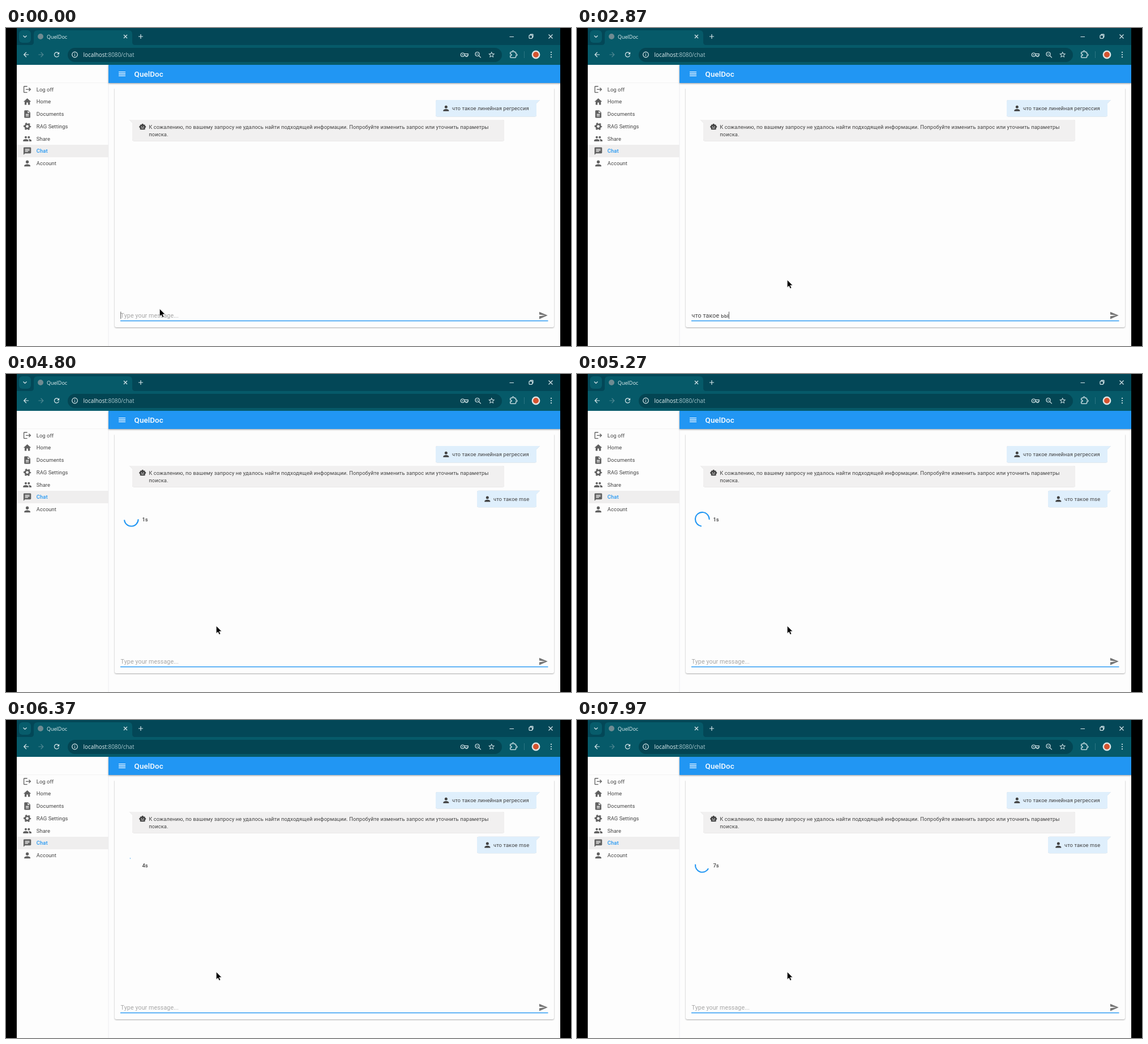
These frames come from a looping animation (998 px wide and 561 px high, 8000 ms). An HTML page:

```html
<!DOCTYPE html>
<html lang="ru">
<head>
<meta charset="utf-8">
<style>
  html, body { margin: 0; width: 100%; height: 100%; overflow: hidden; background: #000; }
  svg { display: block; }
  text { font: 9.33px Roboto, sans-serif; letter-spacing: .01071em; fill: #424242; white-space: pre; }
  .chrome { font-family: "Open Sans", sans-serif; letter-spacing: 0; fill: #e4f0f2; }
  .line { fill: none; stroke: #d9e8eb; stroke-width: 1.2; }
  .input { font-size: 10.67px; letter-spacing: .00938em; }
  .bubble { filter: drop-shadow(0 .7px .6px #0003); }
</style>
</head>
<body>
<svg id="stage" width="998" height="561" viewBox="0 0 998 561"></svg>
<script>
const APP = 'QuelDoc';
const LOOP = 8000, SENT = 4300, BLINK = 265;

const paths = {
  logout: 'M17 7l-1.41 1.41L18.17 11H8v2h10.17l-2.58 2.58L17 17l5-5zM4 5h8V3H4c-1.1 0-2 .9-2 2v14c0 1.1.9 2 2 2h8v-2H4V5z',
  home: 'M10 20v-6h4v6h5v-8h3L12 3 2 12h3v8z',
  doc: 'M14 2H6c-1.1 0-1.99.9-1.99 2L4 20c0 1.1.89 2 1.99 2H18c1.1 0 2-.9 2-2V8l-6-6zm2 16H8v-2h8v2zm0-4H8v-2h8v2zm-3-5V3.5L18.5 9H13z',
  people: 'M16 11a3 3 0 1 0-3-3 3 3 0 0 0 3 3zm-8 0a3 3 0 1 0-3-3 3 3 0 0 0 3 3zm0 2c-2.33 0-7 1.17-7 3.5V19h14v-2.5c0-2.33-4.67-3.5-7-3.5zm8 0c-.29 0-.62.02-.97.05 1.16.84 1.97 1.97 1.97 3.45V19h6v-2.5c0-2.33-4.67-3.5-7-3.5z',
  chat: 'M20 2H4c-1.1 0-1.99.9-1.99 2L2 22l4-4h14c1.1 0 2-.9 2-2V4c0-1.1-.9-2-2-2zM6 9h12v2H6V9zm8 5H6v-2h8v2zm4-6H6V6h12v2z',
  person: 'M12 12a4 4 0 1 0-4-4 4 4 0 0 0 4 4zm0 2c-2.67 0-8 1.34-8 4v2h16v-2c0-2.66-5.33-4-8-4z',
  robot: 'M20 9V7c0-1.1-.9-2-2-2h-3a3 3 0 0 0-6 0H6c-1.1 0-2 .9-2 2v2a3 3 0 0 0 0 6v4c0 1.1.9 2 2 2h12c1.1 0 2-.9 2-2v-4a3 3 0 0 0 0-6zM7.5 11.5a1.5 1.5 0 1 1 3 0 1.5 1.5 0 0 1-3 0zM16 17H8v-2h8v2zm-1-4a1.5 1.5 0 1 1 0-3 1.5 1.5 0 0 1 0 3z',
  send: 'M2.01 21L23 12 2.01 3 2 10l15 2-15 2z',
  menu: 'M3 18h18v-2H3zm0-5h18v-2H3zm0-7v2h18V6z',
  back: 'M20 11H7.83l5.59-5.59L12 4l-8 8 8 8 1.41-1.41L7.83 13H20z',
  reload: 'M17.65 6.35A8 8 0 1 0 19.73 14h-2.08A6 6 0 1 1 16.22 7.78L13 11h7V4z',
  star: 'M22 9.24l-7.19-.62L12 2 9.19 8.63 2 9.24l5.46 4.73L5.82 21 12 17.27 18.18 21l-1.63-7.03zM12 15.4l-3.76 2.27 1-4.28-3.32-2.88 4.38-.38L12 6.1l1.71 4.04 4.38.38-3.32 2.88 1 4.28z',
  puzzle: 'M20.5 11H19V7c0-1.1-.9-2-2-2h-4V3.5a2.5 2.5 0 0 0-5 0V5H4c-1.1 0-2 .9-2 2v3.8h1.5a2.7 2.7 0 0 1 0 5.4H2V20c0 1.1.9 2 2 2h13c1.1 0 2-.9 2-2v-4h1.5a2.5 2.5 0 0 0 0-5z'
};

const rect = (x, y, w, h, fill, more = '') =>
  `<rect x="${x}" y="${y}" width="${w}" height="${h}" fill="${fill}" ${more}/>`;
const circle = (x, y, r, more = '') => `<circle cx="${x}" cy="${y}" r="${r}" ${more}/>`;
const text = (x, y, str, more = '') => `<text x="${x}" y="${y}" ${more}>${str}</text>`;
const line = (d, more = '') => `<path class="line" d="${d}" ${more}/>`;
const icon = (name, cx, cy, size, fill, more = '') =>
  `<path d="${paths[name]}" fill="${fill}" ${more} transform="translate(${cx} ${cy}) scale(${size / 24}) translate(-12 -12)"/>`;

const gear = (x, y) => `<g fill="none" stroke="#616161">
  ${circle(x, y, 3.8, 'stroke-width="2.8"')}
  ${circle(x, y, 5.6, 'stroke-width="2" stroke-dasharray="2.93" stroke-dashoffset="1.46"')}</g>`;

function userBubble(x, y, str) {
  return `<path class="bubble" d="M${x + 3} ${y}H943L937 ${y + 6}V${y + 26.5}a3 3 0 0 1-3 3H${x + 3}a3 3 0 0 1-3-3V${y + 3}a3 3 0 0 1 3-3Z" fill="#dfeffc"/>` +
    icon('person', x + 18.3, y + 14.7, 15, '#424242') + text(x + 29, y + 18, str);
}

function browser() {
  const ink = '#d9e8eb';
  return rect(19, 0, 960, 65, '#034757') +
    rect(23, 4, 21, 22, '#075c6b', 'rx="6"') + line('M30.5 13.5l3 3 3-3', 'stroke-width="1.4"') +
    `<path d="M19 65V30H44Q49 30 49 25V11Q49 4 56 4H216Q223 4 223 11V25Q223 30 228 30H979V65Z" fill="#065a69"/>` +
    circle(61, 15, 5, 'fill="#6f8b92"') +
    text(72, 18.5, APP, 'class="chrome" style="font-size:9px"') +
    line('M208 12l6 6m0-6l-6 6M234 15h8m-4-4v8') +
    line('M889.5 15.5h7.5M958.5 11.5l7 7m0-7l-7 7M926 12.5v-.5q0-.8.8-.8h3.4q.8 0 .8.8v3.6q0 .8-.8.8h-.4') +
    rect(924, 12.7, 5.6, 5.6, 'none', 'class="line" rx="1"') +
    icon('back', 35.5, 47, 14, ink) +
    icon('back', -62, 47, 14, '#4f8792').replace('<path', '<g transform="scale(-1 1)"><path') + '</g>' +
    icon('reload', 89.5, 47, 14, ink) +
    rect(109, 35, 767, 25, '#034553', 'rx="12.5"') +
    circle(121.5, 47, 4.8, 'class="line"') + line('M121.5 46.5v3M121.5 44.2v1.2') +
    `<text class="chrome" x="136.5" y="50.5" style="font-size:9.9px">localhost<tspan fill="#a6c6cc">:8080/chat</tspan></text>` +
    circle(806.5, 47.2, 3.2, 'class="line"') + circle(806.5, 47.2, 1, `fill="${ink}"`) +
    line('M809.5 45.7h6.7v3h-1.5v1.8h-2.5v-1.8h-2.7') +
    circle(832.5, 46, 3.5, 'class="line"') + line('M835 48.6l3.8 3.8M831 46h3') +
    icon('star', 857.7, 47, 13.5, ink) +
    icon('puzzle', 896.5, 46.5, 14, 'none', `stroke="${ink}" stroke-width="2.2"`) +
    rect(915, 41, 1, 12, '#2b7482') +
    circle(936, 47, 6.2, 'fill="#d4532f" stroke="#dfe3e3" stroke-width="2.4"') +
    [42.8, 47, 51.2].map(y => circle(963, y, 1.1, `fill="${ink}"`)).join('');
}

function sidebar() {
  const rows = [['logout', 'Log off'], ['home', 'Home'], ['doc', 'Documents'], ['gear', 'RAG Settings'],
    ['people', 'Share'], ['chat', 'Chat'], ['person', 'Account']];
  return rect(180.5, 97, 1, 464, '#eeeef1') + rect(19, 96.5, 162, .7, '#eeeeee') +
    rect(19, 206, 162, 22, '#efeeee') +
    rows.map(([name, label], i) => {
      const y = 108.3 + i * 21.77;
      return (name === 'gear' ? gear(37.6, y) : icon(name, 37.6, y, 16, '#616161')) +
        text(53.8, y + 3.3, label, name === 'chat' ? 'style="fill:#2196f3;font-weight:500"' : '');
    }).join('');
}

function page() {
  return rect(19, 65, 960, 496, '#fdfdfd') +
    rect(192, 105, 776, 423, '#fdfdfd', 'rx="3" style="filter:drop-shadow(0 1px 1px #0005)"') +
    rect(188, 98, 784, 9, '#fdfdfd') + sidebar() +
    rect(181, 65, 800, 32, '#2196f3', 'style="filter:drop-shadow(0 1.5px 1.8px #0006)"') +
    icon('menu', 205, 81, 16, '#fff') +
    text(226.6, 85.5, APP, 'style="font-size:13.33px;font-weight:500;fill:#fff;letter-spacing:.0075em"') +
    userBubble(759, 127, 'что такое линейная регрессия') +
    `<path class="bubble" d="M218 162H877a3 3 0 0 1 3 3V196.5a3 3 0 0 1-3 3H226a3 3 0 0 1-3-3V167Z" fill="#f1f0f0"/>` +
    icon('robot', 241.2, 174.3, 13.4, '#424242') +
    text(252.3, 177.7, 'К сожалению, по вашему запросу не удалось найти подходящей информации. Попробуйте изменить запрос или уточнить параметры') +
    text(252.3, 191, 'поиска.') +
    rect(202, 515.9, 755.5, 1.4, '#2196f3') + icon('send', 949, 507, 17, '#757575');
}

const stage = document.getElementById('stage');
stage.innerHTML = page() + browser() +
  `<g id="reply">${userBubble(832, 205.7, 'что такое mse')}
    <path id="arc" fill="none" stroke="#2196f3" stroke-width="2.1"/>
    ${text(240.4, 259.7, '', 'id="count" style="font-weight:500"')}</g>` +
  text(202.6, 510.5, '', 'id="field" class="input"') +
  rect(202, 500.5, .8, 12.5, '#333', 'id="caret"') +
  `<path id="mouse" d="M0 0V13.2l3-2.8 2.1 4.7 2.3-1-2.1-4.6H9.5Z" fill="#000" stroke="#fff" stroke-width=".6"/>` +
  rect(0, 0, 19, 561, '#000') + rect(979, 0, 19, 561, '#000');

const [reply, arc, count, field, caret, mouse] =
  ['reply', 'arc', 'count', 'field', 'caret', 'mouse'].map(id => document.getElementById(id));

// Key presses: [time, characters], '<' deletes one
const keys = [[500, 'ч'], [586, 'т'], [672, 'о'], [758, ' '], [844, 'т'], [930, 'а'],
  [1130, 'к'], [1180, 'о'], [1240, 'е'], [1300, ' '],
  [2370, 'ь'], [2470, 'ы'], [2570, 'у'], [2870, '<'], [2900, '<'], [2930, '<<'],
  [3630, ' '], [3730, 'm'], [3810, 's'], [3900, 'e']];

const clamp = v => Math.min(1, Math.max(0, v));

// cubic-bezier(.42, 0, .58, 1)
function easeInOut(x) {
  let lo = 0, hi = 1;
  for (let i = 0; i < 20; i++) {
    const s = (lo + hi) / 2;
    const bx = 3 * s * (1 - s) * (.42 * (1 - s) + .58 * s) + s ** 3;
    if (bx < x) lo = s; else hi = s;
  }
  return lo * lo * (3 - 2 * lo);
}

function spinner(t) {
  const u = (((t - 4286) / 700) % 1 + 1) % 1;
  const e = easeInOut(u * 2 % 1), full = 40 * Math.PI;
  const offset = u < .5 ? 15 * e : 15 + 110 * e;
  const end = Math.min(full, offset + (u < .5 ? 1 + 99 * e : 100));
  const at = d => {
    const a = d / 20 + (u - .25) * 2 * Math.PI;
    return `${221.3 + 12.3 * Math.cos(a)} ${256.2 + 12.3 * Math.sin(a)}`;
  };
  return `M${at(offset)}A12.3 12.3 0 ${end - offset > full / 2 ? 1 : 0} 1 ${at(end)}`;
}

function draw(t) {
  let typed = '', lastKey = 0;
  const sent = t >= SENT;
  if (sent) lastKey = SENT;
  else for (const [time, chars] of keys) {
    if (time > t) break;
    lastKey = time;
    for (const c of chars) typed = c === '<' ? typed.slice(0, -1) : typed + c;
  }
  field.textContent = typed;
  const width = typed ? field.getComputedTextLength() : 0;
  caret.setAttribute('x', 202.4 + width);
  caret.style.display = Math.floor((t - lastKey) / BLINK) % 2 ? 'none' : '';
  field.textContent = typed || 'Type your message...';
  field.style.fill = typed ? '#424242' : '#a6a6a6';

  reply.style.display = sent ? '' : 'none';
  if (sent) {
    arc.setAttribute('d', spinner(t));
    count.textContent = Math.floor((t - 4275) / 513) + 's';
  }
  const m = easeInOut(clamp((t - 1980) / 190));
  mouse.setAttribute('transform', `translate(${271.4 + 100 * m} ${495.5 - 51 * m})`);
}

function tick() {
  draw(performance.now() % LOOP);
  requestAnimationFrame(tick);
}
tick();
</script>
</body>
</html>
```
